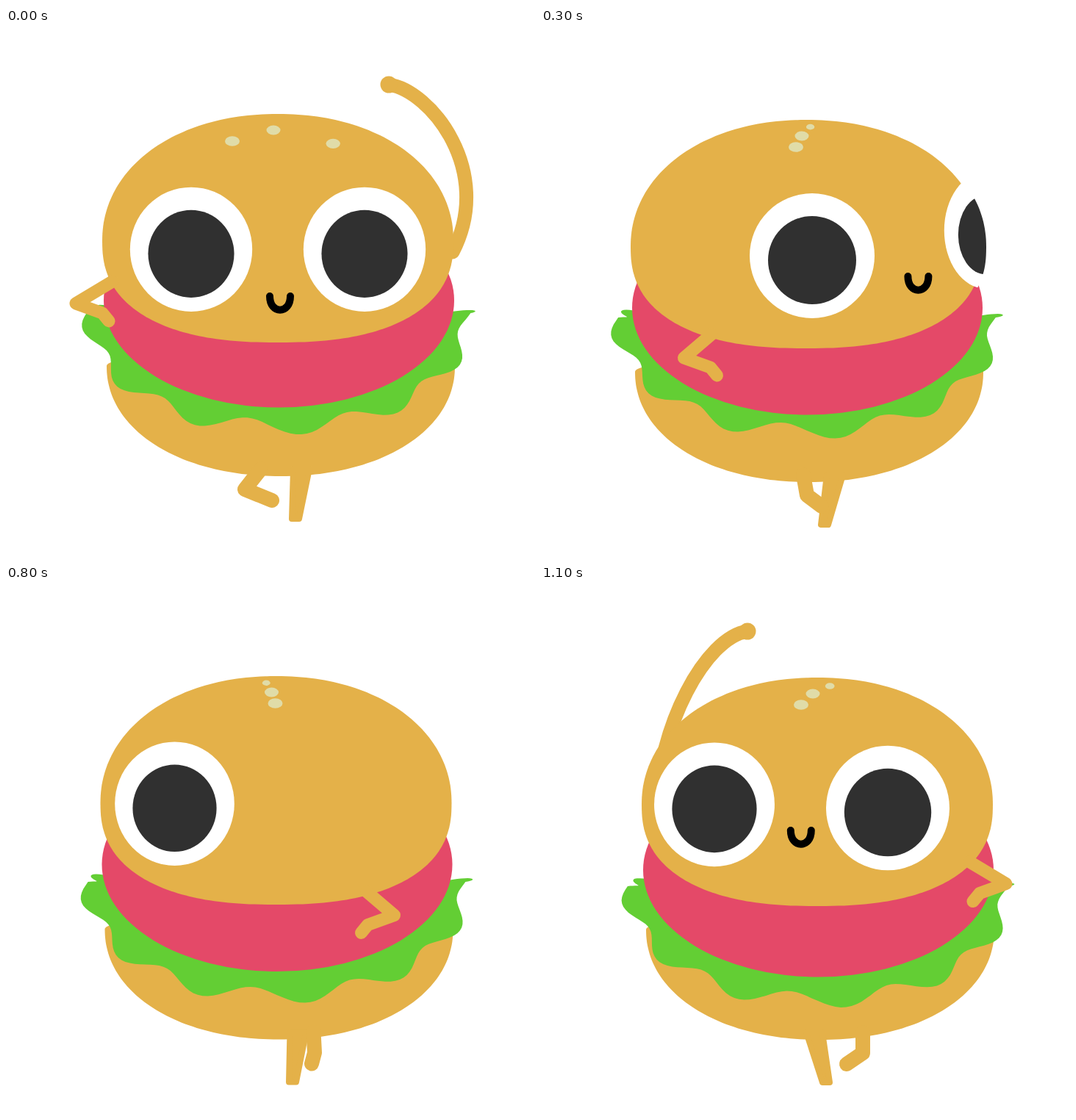
Animation, 720 px wide and 720 px high, one loop 1200 ms. Source, as an HTML page:

```html
<!DOCTYPE html>
<html lang="en">
<head>
<meta charset="utf-8">
<title>Dancing burger</title>
<style>
  html, body { margin: 0; width: 100%; height: 100%; overflow: hidden; background: #fff; }
  svg { display: block; overflow: hidden; }
</style>
</head>
<body>
<svg id="stage" width="100%" height="100%" viewBox="0 0 720 720"><g id="strip"></g></svg>
<script>
const SIZE = 720, BEATS = 12, BEAT_MS = 100, MID = 370;
const BUN = '#e4b149', MEAT = '#e44968', LEAF = '#63ce34';
const SEED = '#e0dca8', PUPIL = '#303030';

// Each track holds one value per key beat; beats between are blended.
const keyBeats = [0, 1, 3, 5, 7, 9, 11];
const tracks = {
  sway: [0, -7, -9, -5, -8, 3, 6],
  bunY: [0, 6, 8, 1, 8, 6, 9],
  pattyY: [0, 13, 10, 7, 9, 10, 17],
  baseY: [0, 6, 8, 9, 9, 8, 9],
  frill: [24, 4, -8, -38, -55, -81, -97],
  spin: [56, 37, 8, -17, -12, 2, 16],
  face: [370, 406, 487, 740, -20, 243, 354],
  smileY: [365, 363, 338, 338, 338, 338, 334],
  armX: [145, 180, 232, 368, 450, 532, 583],
  armBend: [-1, -0.9, -0.75, 0, 0.5, 1, 1],
  handX: [521, 494, 440, 400, 360, 330, 281],
  handY: [77, 61, 75, 75, 75, 75, 63],
  shoulderX: [608, 598, 580, 500, 260, 190, 158],
  lean: [57, 7, 0, 0, 0, 0, 0],
  legHip: [402, 398, 400, 398, 392, 403, 372],
  legFoot: [394, 386, 386, 382, 380, 400, 388],
  kickHip: [347, 340, 357, 408, 412, 425, 438],
  kickKnee: [325, 330, 362, 408, 412, 428, 438],
  kickToe: [362, 356, 382, 385, 424, 408, 416]
};

function poseAt(beat) {
  const i = Math.max(1, keyBeats.findIndex(b => b >= beat));
  const k = (beat - keyBeats[i - 1]) / (keyBeats[i] - keyBeats[i - 1]);
  const pose = { beat };
  for (const key in tracks) {
    const [a, b] = tracks[key].slice(i - 1, i + 1);
    pose[key] = a + (b - a) * k;
  }
  return pose;
}

function el(name, attrs, parent) {
  const node = document.createElementNS('http://www.w3.org/2000/svg', name);
  for (const key in attrs) node.setAttribute(key, attrs[key]);
  parent.append(node);
  return node;
}

const oval = (cx, cy, rx, ry, fill, parent) => el('ellipse', { cx, cy, rx, ry, fill }, parent);
const fillPath = (d, fill, parent) => el('path', { d, fill }, parent);
const strokePath = (d, stroke, width, parent) => el('path', {
  d, stroke, fill: 'none', 'stroke-width': width, 'stroke-linecap': 'round', 'stroke-linejoin': 'round'
}, parent);

// Superellipse with its own height and squareness above and below the middle.
function blob({ cx, cy, rx, up, down, nUp = 2.1, nDown = 2.1, wave = () => 0 }) {
  const steps = 240, pts = [];
  const power = (v, n) => Math.sign(v) * Math.abs(v) ** (2 / n);
  for (let i = 0; i < steps; i++) {
    const a = i / steps * 2 * Math.PI, c = Math.cos(a), s = Math.sin(a);
    const [ry, n] = s > 0 ? [down, nDown] : [up, nUp];
    const x = cx + rx * power(c, n) + wave(a) * c;
    const y = cy + ry * power(s, n) + wave(a) * s;
    pts.push(`${x.toFixed(1)},${y.toFixed(1)}`);
  }
  return 'M' + pts.join('L') + 'Z';
}

const bunShape = p => ({ cx: MID + p.sway, cy: 290 + p.bunY, rx: 239, up: 173, down: 138, nDown: 2.4 });

function bunBottom(p, x) {
  const { cx, cy, rx, down, nDown } = bunShape(p);
  return cy + down * (1 - Math.min(1, Math.abs(x - cx) / rx) ** nDown) ** (1 / nDown);
}

function drawRaisedArm(p, cell) {
  if (p.beat > 2 && p.beat < 10) return;
  const side = p.beat < 6 ? 1 : -1, { handX: x, handY: y, shoulderX: sx } = p, sy = 305;
  strokePath(`M${x},${y}C${x + side * 57},${y + 8} ${sx + p.lean},${sy - 110} ${sx},${sy}`, BUN, 19, cell);
  oval(x, y, 11.5, 11.5, BUN, cell);
}

function drawLegs(p, cell) {
  const top = 600 + p.baseY, foot = 668 + p.baseY;
  const leg = `M${p.legHip - 11},${top}L${p.legFoot - 5},${foot}h10L${p.legHip + 11},${top}Z`;
  strokePath(leg, BUN, 8, cell).setAttribute('fill', BUN);
  strokePath(`M${p.kickHip},${top}L${p.kickKnee},${top + 28}L${p.kickToe},${top + 43}`, BUN, 20, cell);
}

function drawBentArm(p, cell) {
  if (p.beat === 7) return;
  const side = p.beat < 7 ? 1 : -1, y = bunBottom(p, p.armX) - 5;
  const bend = 50 * p.armBend, drop = 38 - 8 * Math.abs(p.armBend);
  strokePath(`M${p.armX},${y}l${bend},${drop}l${side * 36},13l${side * 9},11`, BUN, 17, cell);
}

function drawSeeds(p, cell) {
  const x = 364 + p.sway, y = p.bunY, far = 5 + Math.abs(p.spin) / 12;
  oval(x - p.spin, 154 + y, 10, 6.7, SEED, cell);
  oval(x, 139 + y, 9.5, 6.5, SEED, cell);
  oval(x + p.spin * 1.45, 126 + y + p.spin ** 2 / 100, far, far * 0.68, SEED, cell);
}

function drawFace(p, cell) {
  if (p.beat >= 5 && p.beat <= 7) return;
  const id = 'bun' + p.beat;
  fillPath(blob({ ...bunShape(p), rx: 245 }), '#000', el('clipPath', { id }, cell));
  const front = el('g', { 'clip-path': `url(#${id})` }, cell);

  // Eyes rise and narrow as they turn towards the edge.
  for (const side of [-1, 1]) {
    const x = p.face + side * 118, off = x - MID;
    const y = 310 - 25 * (off / 200) ** 2, turn = Math.min(2, (off / 245) ** 4);
    oval(x, y, 85 * (1 - 0.4 * turn), 85 * (1 - 0.08 * turn), '#fff', front);
    oval(x, y + 6, 60 * (1 - 0.45 * turn), 60 * (1 - 0.12 * turn), PUPIL, front);
  }
  const x = p.face + 0.2 * (p.face - MID) + 3;
  strokePath(`M${x - 14},${p.smileY}c0,25 28,25 28,0`, '#000', 10, front);
}

function draw(p, strip) {
  const cell = el('svg', { x: p.beat * SIZE, width: SIZE, height: SIZE }, strip);
  const ruffle = a => 11 * Math.cos(12 * (a - p.frill * Math.PI / 180));

  drawRaisedArm(p, cell);
  fillPath(blob({ cx: 374 + p.sway, cy: 460 + p.baseY, rx: 237, up: 20, down: 150 }), BUN, cell);
  drawLegs(p, cell);
  fillPath(blob({ cx: 371 + p.sway, cy: 388 + 2 * p.beat, rx: 258, up: 15, down: 155, wave: ruffle }), LEAF, cell);
  oval(371.5 + p.sway, 371 + p.pattyY, 238.5, 145.5, MEAT, cell);
  fillPath(blob(bunShape(p)), BUN, cell);
  drawSeeds(p, cell);
  drawFace(p, cell);
  drawBentArm(p, cell);
}

const strip = document.getElementById('strip');
for (let beat = 0; beat < BEATS; beat++) draw(poseAt(beat), strip);
strip.animate(
  [{ transform: 'translateX(0px)' }, { transform: `translateX(${-SIZE * BEATS}px)` }],
  { duration: BEATS * BEAT_MS, iterations: Infinity, easing: `steps(${BEATS})` }
);
</script>
</body>
</html>
```
